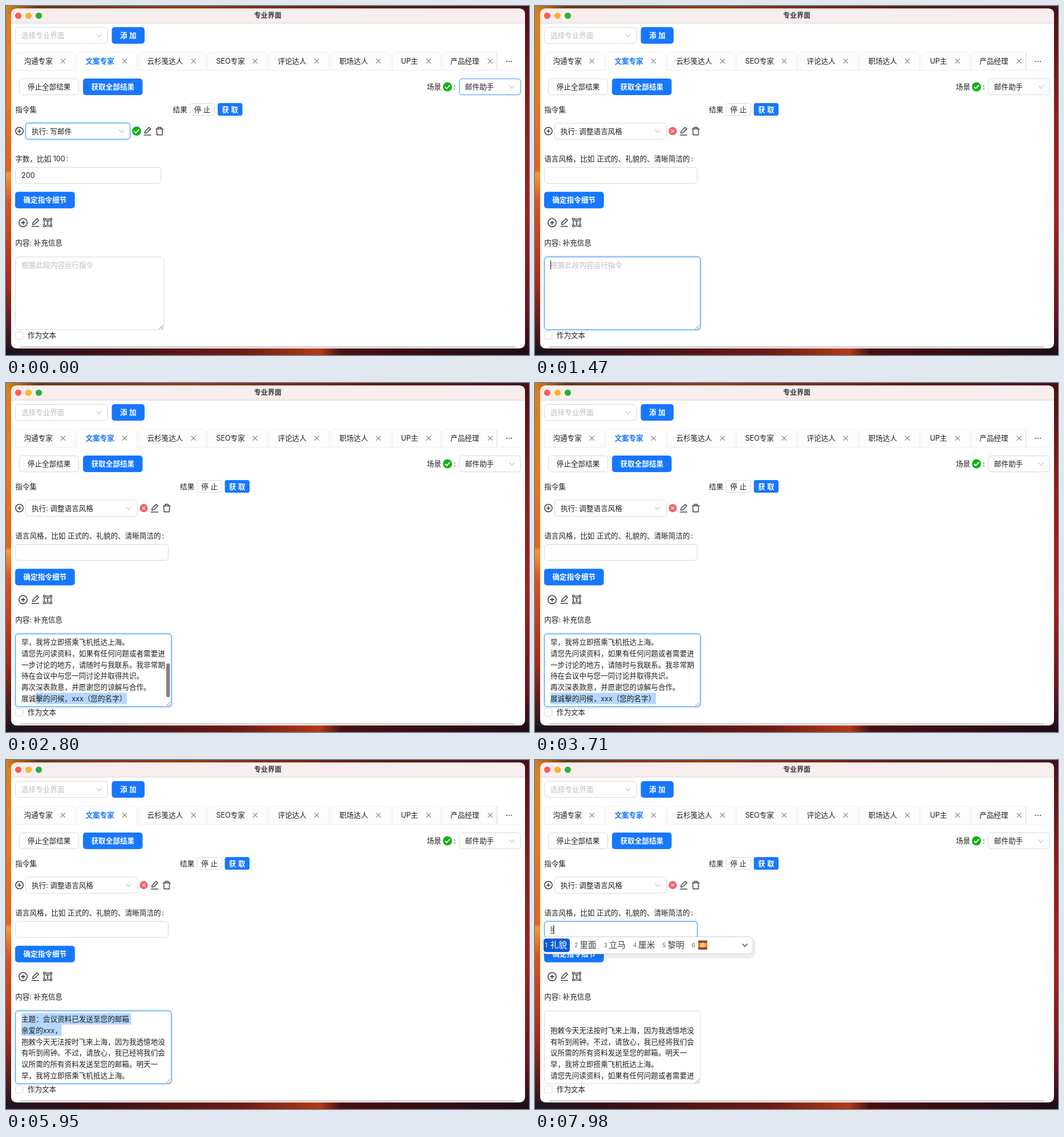
These frames come from a looping animation (917x611 px, 8 s). An HTML page:

```html
<!DOCTYPE html>
<html lang="zh-CN">
<head>
<meta charset="utf-8">
<title>专业界面</title>
<style>
html, body { margin: 0; width: 100%; height: 100%; overflow: hidden; background: #4a1410; }
svg { display: block; width: 100vw; height: 100vh; }
text { font: 12.6px Inter, "Noto Sans CJK SC", "Noto Sans CJK", sans-serif; fill: #1f1f1f; white-space: pre; }
.b { font-weight: 600; }
.mid { text-anchor: middle; }
.white { fill: #fff; }
.dim { fill: #bfbfbf; }
.box { fill: #fff; stroke: #d9d9d9; }
.blue { fill: #1677ff; }
.icon { fill: none; stroke: #1f1f1f; stroke-width: 1.25; }
.chev { fill: none; stroke: #bfbfbf; stroke-width: 1.1; }
.ring { fill: none; stroke: #4096ff; }
.glow { fill: none; stroke: #0591ff; stroke-opacity: .1; stroke-width: 4; }
.sel { fill: #b4d7ff; transform-box: fill-box; transform-origin: right; }
.caret { fill: #111; }
.ime text { font-size: 14.6px; fill: #3f3f3f; }
.ime .n { font-size: 10.5px; fill: #6f6f6f; }
.ime .white { fill: #fff; }

/* 8 s loop: 1% = 80 ms */
.step { animation: 8s step-end infinite; }
.ease { animation: 8s linear infinite; }

.shift { animation-name: shift; }
@keyframes shift { 0% { transform: none } 11.375% { transform: translateX(12.5px) } }
.grow { animation-name: grow; }
@keyframes grow { 0% { width: var(--w) } 11.375% { width: calc(var(--w) + 13px) } }
.before { animation-name: before; }
@keyframes before { 0% { opacity: 1 } 11.375% { opacity: 0 } }
.after { animation-name: after; }
@keyframes after { 0% { opacity: 0 } 11.375% { opacity: 1 } }
.closed { animation-name: closed; }
@keyframes closed { 0% { opacity: 1 } .875% { opacity: 0 } 11.375% { opacity: 1 } }
.start { animation-name: start; }
@keyframes start { 0% { opacity: 1 } .875% { opacity: 0 } }
.open { animation-name: open; }
@keyframes open { 0% { opacity: 0 } .875% { opacity: 1 } 11.375% { opacity: 0 } }
#menu { animation-name: menu; transform-box: fill-box; transform-origin: top; }
@keyframes menu {
  0%, .6% { opacity: 0; transform: scaleY(.8) }
  3.3%, 11.375% { opacity: 1; transform: none }
  13.6%, 100% { opacity: 0; transform: scaleY(.8) }
}
#hover { animation-name: hover; }
@keyframes hover { 0% { opacity: 0 } 9.625% { opacity: 1 } }

#sceneRing { animation-name: sceneRing; }
@keyframes sceneRing { 0%, .875% { opacity: 1 } 3.5%, 100% { opacity: 0 } }
#cmdRing { animation-name: cmdRing; }
@keyframes cmdRing { 0%, 16% { opacity: 1 } 18.3%, 100% { opacity: 0 } }
#areaRing { animation-name: areaRing; }
@keyframes areaRing { 0%, 16% { opacity: 0 } 18.3%, 90.5% { opacity: 1 } 93.6%, 100% { opacity: 0 } }
#inRing { animation-name: inRing; }
@keyframes inRing { 0%, 87% { opacity: 0 } 89.25%, 100% { opacity: 1 } }
#inGlow { animation-name: inGlow; }
@keyframes inGlow { 0%, 90.5% { opacity: 0 } 93.6%, 100% { opacity: 1 } }

#hint { animation-name: hint; }
@keyframes hint { 0% { opacity: 1 } 19.25% { opacity: 0 } }
#body { animation-name: filled; }
@keyframes filled { 0% { opacity: 0 } 19.25% { opacity: 1 } }
#scroll { animation-name: scroll; }
@keyframes scroll {
  0%, 61.5% { transform: translateY(-99px) }
  63.875%, 81.374% { transform: none }
  81.375%, 100% { transform: translateY(-19.8px) }
}
#thumb { animation-name: thumb; }
@keyframes thumb {
  0%, 19.249% { opacity: 0; transform: none }
  19.25%, 26% { opacity: 1 }
  28.875%, 32.374% { opacity: 0 }
  32.375%, 40.5% { opacity: 1 }
  42.875%, 61.4% { opacity: 0 }
  61.5% { opacity: 1; transform: none }
  63.875% { opacity: 1; transform: translateY(-49px) }
  70% { opacity: 1 }
  72.6%, 100% { opacity: 0; transform: translateY(-49px) }
}
#selEnd { animation-name: selEnd; }
@keyframes selEnd {
  0%, 31.6% { opacity: 1; transform: scaleX(0) }
  35% { transform: scaleX(.865) }
  37.625%, 55.999% { opacity: 1; transform: none }
  56%, 100% { opacity: 0; transform: none }
}
#selPrev { animation-name: selPrev; }
@keyframes selPrev { 0% { opacity: 0 } 45.5% { opacity: 1 } 46.375% { opacity: 0 } }
#selTwo { animation-name: selTwo; }
@keyframes selTwo { 0%, 70% { transform: scaleX(0) } 72.6%, 100% { transform: none } }
#selOne { animation-name: selOne; }
@keyframes selOne { 0%, 71.75% { transform: scaleX(0) } 74.375%, 100% { transform: none } }
#tail { animation-name: tail; }
@keyframes tail { 0% { opacity: 1 } 56% { opacity: 0 } }
#head { animation-name: head; }
@keyframes head { 0% { opacity: 1 } 81.375% { opacity: 0 } }
#caretTop { animation-name: caretTop; }
@keyframes caretTop { 0% { opacity: 0 } 16.625% { opacity: 1 } 19.25% { opacity: 0 } 81.375% { opacity: 1 } 87.5% { opacity: 0 } }
#caretEnd { animation-name: caretEnd; }
@keyframes caretEnd { 0% { opacity: 1 } 26.25% { opacity: 0 } }
#caretCut { animation-name: caretCut; }
@keyframes caretCut { 0% { opacity: 0 } 56% { opacity: 1 } 81.375% { opacity: 0 } }
#caretIn { animation-name: caretIn; }
@keyframes caretIn { 0% { opacity: 0 } 91% { opacity: 1 } 96.25% { opacity: 0 } }
#ime { animation-name: ime; }
@keyframes ime { 0% { opacity: 0 } 96.25% { opacity: 1 } }
</style>
</head>
<body>
<svg viewBox="0 0 917 611" preserveAspectRatio="none">
<defs>
  <linearGradient id="top"><stop offset="0" stop-color="#d8831c"/><stop offset=".06" stop-color="#6b3412"/><stop offset=".35" stop-color="#8a3d14"/><stop offset=".7" stop-color="#5a1a12"/><stop offset="1" stop-color="#4a0f14"/></linearGradient>
  <linearGradient id="left" x2="0" y2="1"><stop offset="0" stop-color="#d9821b"/><stop offset=".25" stop-color="#e8781a"/><stop offset=".47" stop-color="#e4631a"/><stop offset=".48" stop-color="#f59a2e"/><stop offset=".56" stop-color="#e0531a"/><stop offset=".8" stop-color="#a52a18"/><stop offset="1" stop-color="#1c1420"/></linearGradient>
  <linearGradient id="right" x2="0" y2="1"><stop offset="0" stop-color="#4a0f14"/><stop offset=".3" stop-color="#8f1c18"/><stop offset=".6" stop-color="#a32119"/><stop offset=".88" stop-color="#6a1220"/><stop offset="1" stop-color="#1e0c16"/></linearGradient>
  <linearGradient id="low"><stop offset="0" stop-color="#1c1420"/><stop offset=".15" stop-color="#3a1018"/><stop offset=".45" stop-color="#6d1a14"/><stop offset=".6" stop-color="#b23a16"/><stop offset=".64" stop-color="#4a1014"/><stop offset="1" stop-color="#1e0c16"/></linearGradient>
  <clipPath id="tabClip"><path d="M9 75H860V115H9z"/></clipPath>
  <clipPath id="areaClip"><path d="M17 440H289V566H17z"/></clipPath>
  <path id="chev" class="chev" d="M-4.6-2.4L0 2.6L4.6-2.4"/>
  <g id="plus" class="icon"><circle r="6.7"/><path d="M-3.4 0H3.4M0-3.4V3.4"/></g>
  <path id="edit" class="icon" d="M-6.5 6.8H6.5M-4.8 3.6L-4.2.4L2.8-6.6L5.6-3.8L-1.4 3.1z"/>
  <path id="trash" class="icon" d="M-6.6-4H6.6M-5.1-4L-4.6 6.6H4.6L5.1-4M-2.7-4V-6.6H2.7V-4"/>
  <g id="tbox" class="icon"><path d="M-4.5-6H4.5M-4.5 6H4.5M-6-4.5V4.5M6-4.5V4.5M-3-2V-3H3V-2M0-3V3.3M-1.5 3.3H1.5"/><path d="M-7.5-7.5h3v3h-3zM4.5-7.5h3v3h-3zM-7.5 4.5h3v3h-3zM4.5 4.5h3v3h-3z" stroke-width="1"/></g>
  <g id="ok"><circle r="8" fill="#0bb414"/><path d="M-4.2.2L-1.3 3.1L4.2-2.8" fill="none" stroke="#fff" stroke-width="2"/></g>
</defs>

<path fill="url(#low)" d="M0 590H917V611H0z"/>
<path fill="url(#left)" d="M0 0H20V611H0z"/>
<path fill="url(#right)" d="M897 0H917V611H897z"/>
<path fill="url(#top)" d="M0 0H917V14H0z"/>
<path fill="url(#low)" d="M0 600H917V611H0z"/>
<rect x="9" y="4.5" width="901" height="595" rx="9" fill="#fff"/>
<path fill="#f8eeee" d="M9 30V13.5a9 9 0 0 1 9-9H901a9 9 0 0 1 9 9V30z"/>
<path fill="#dcd4d4" d="M9 29.5H910V30.5H9z"/>
<circle cx="21.5" cy="17" r="5.6" fill="#fe5b54"/>
<circle cx="39.5" cy="17" r="5.6" fill="#fab32e"/>
<circle cx="57.5" cy="17" r="5.6" fill="#27b23e"/>
<text class="b mid" x="459" y="21.2" style="font-size:12px;fill:#3c3636">专业界面</text>

<rect class="box" x="16.5" y="37.5" width="161.5" height="28" rx="5"/>
<text class="dim" x="27" y="56">选择专业界面</text>
<use href="#chev" x="163" y="51.5"/>
<rect class="blue" x="185.5" y="37" width="57.5" height="29" rx="5"/>
<text class="b mid white" x="214.3" y="56">添 加</text>

<path fill="#f0f0f0" d="M16 112H903V113H16z"/>
<g id="tabs" clip-path="url(#tabClip)"></g>
<path fill="#e2e2e2" d="M860 81H861.5V112H860z"/>
<path stroke="#333" stroke-width="1.7" stroke-dasharray="1.7 2.3" d="M877.2 96.8H888"/>

<rect class="box" x="23.5" y="127.5" width="104" height="28" rx="5"/>
<text class="mid" x="75.6" y="146">停止全部结果</text>
<rect class="blue" x="135" y="127" width="104.5" height="29" rx="5"/>
<text class="b mid white" x="187.3" y="146">获取全部结果</text>
<text x="738" y="146">场景</text>
<use href="#ok" x="774" y="141.5"/>
<text x="785" y="146">:</text>
<rect class="box" x="795" y="127.5" width="107.5" height="28" rx="5"/>
<rect id="sceneRing" class="ease ring" x="795" y="127.5" width="107.5" height="28" rx="5"/>
<text x="805" y="146">邮件助手</text>
<use href="#chev" x="887" y="141.5"/>

<text x="16.2" y="185.5">指令集</text>
<g class="step shift">
  <text x="292.6" y="185.5">结果</text>
  <rect class="box" x="322.7" y="170.5" width="43" height="21" rx="3.5"/>
  <text class="mid" x="344.2" y="185.7">停 止</text>
  <rect class="blue" x="371.2" y="170" width="43.3" height="22" rx="3.5"/>
  <text class="b mid white" x="392.8" y="185.7">获 取</text>
</g>

<use href="#plus" x="23.5" y="219"/>
<rect class="box step grow" style="--w:183px" x="34.5" y="205" width="183" height="28.3" rx="5"/>
<g id="cmdRing" class="ease">
  <rect class="glow step grow" style="--w:185px" x="33.5" y="204" width="185" height="30.3" rx="6"/>
  <rect class="ring step grow" style="--w:183px" x="34.5" y="205" width="183" height="28.3" rx="5"/>
</g>
<text class="step start" x="45" y="223.5">执行: 写邮件</text>
<text class="dim step open" x="45" y="223.5">执行: 写邮件</text>
<text class="step after" x="45" y="223.5">执行: 调整语言风格</text>
<g class="step open"><path class="chev" d="M204.2 220.8l3.2 3.2M205.3 218a3.6 3.6 0 1 1-7.2 0a3.6 3.6 0 0 1 7.2 0"/></g>
<g class="step shift">
  <g class="step closed"><use href="#chev" x="202.7" y="219"/></g>
  <g class="step before"><use href="#ok" x="229" y="219"/></g>
  <g class="step after"><circle cx="229" cy="219" r="7.2" fill="#f0616b"/><path stroke="#fff" stroke-width="1.2" d="M226.4 216.4l5.2 5.2m0-5.2l-5.2 5.2"/></g>
  <use href="#edit" x="248" y="219"/>
  <use href="#trash" x="269.3" y="219"/>
</g>

<text class="step before" x="16.2" y="272.3">字数，比如 100<tspan dx="2">:</tspan></text>
<text class="step after" x="16.2" y="272.3">语言风格，比如 正式的、礼貌的、清晰简洁的<tspan dx="2">:</tspan></text>
<rect class="box step grow" style="--w:255px" x="16.5" y="282.5" width="255" height="28" rx="5"/>
<rect id="inGlow" class="ease glow" x="15.5" y="281.5" width="270" height="30" rx="6"/>
<rect id="inRing" class="ease ring" x="16.5" y="282.5" width="268" height="28" rx="5"/>
<text class="step before" x="27" y="301">200</text>
<rect id="caretIn" class="caret step" x="27" y="288" width="1" height="16"/>

<rect class="blue" x="16" y="325.3" width="104.7" height="29" rx="5"/>
<text class="b mid white" x="68.3" y="344.4">确定指令细节</text>
<g transform="translate(30 379.3) scale(1.08)"><use href="#plus"/></g>
<use href="#edit" x="51.5" y="379"/>
<use href="#tbox" x="73" y="379"/>
<text x="16.2" y="419">内容: 补充信息</text>

<rect class="box step grow" style="--w:260.5px" x="16.5" y="439.2" width="260.5" height="127.5" rx="5"/>
<g id="areaRing" class="ease">
  <rect class="glow" x="15.5" y="438.2" width="275.5" height="129.5" rx="6"/>
  <rect class="ring" x="16.5" y="439.2" width="273.5" height="127.5" rx="5"/>
</g>
<text id="hint" class="dim step" x="27" y="458">根据此段内容运行指令</text>
<g clip-path="url(#areaClip)">
  <g id="body" class="step"><g id="scroll" class="ease">
    <g id="head" class="step">
      <rect id="selOne" class="sel ease" x="27" y="443.3" width="192.5" height="19.8"/>
      <rect id="selTwo" class="sel ease" x="27" y="463.1" width="70.5" height="19.8"/>
    </g>
    <rect id="selPrev" class="sel step" x="27" y="621.5" width="230" height="19.8"/>
    <rect id="selEnd" class="sel ease" x="27" y="641.3" width="185" height="19.8"/>
    <rect id="caretEnd" class="caret step" x="211.5" y="643.5" width="1" height="15.5"/>
    <rect id="caretCut" class="caret step" x="27" y="643.5" width="1" height="15.5"/>
  </g></g>
  <rect id="caretTop" class="caret step" x="27" y="445.5" width="1" height="16"/>
  <rect id="thumb" class="ease" x="281" y="491" width="6.3" height="59" rx="3.1" fill="#828282"/>
</g>
<path class="step shift" fill="none" stroke="#777" d="M268.5 565.5l7-7M272.5 565.5l3-3"/>
<rect class="box" x="16.5" y="570" width="13.5" height="13.5" rx="3.2"/>
<text x="37.8" y="581.3">作为文本</text>
<path fill="#a9a9a9" d="M25 596.2H893V597.6H25z"/>

<g id="menu" class="ease">
  <rect x="27" y="237" width="199.5" height="252.5" rx="15" opacity=".05"/>
  <rect x="32" y="238" width="189" height="240" rx="9" opacity=".05"/>
  <rect x="34" y="237" width="185" height="238" rx="7" fill="#fff"/>
  <path fill="#e4f8ff" d="M42 241H208V269.5H42a4 4 0 0 1-4-4V245a4 4 0 0 1 4-4z"/>
  <rect id="hover" class="step" x="38" y="269.7" width="170" height="28.7" rx="4" fill="#f4f4f4"/>
  <rect x="208" y="240.5" width="7.2" height="45.5" rx="3.6" fill="#7b8492"/>
</g>

<g id="ime" class="step ime">
  <path fill="none" stroke="#333" d="M27 303.5H33"/>
  <text x="27" y="301" style="font-size:12.6px">li</text>
  <rect class="caret" x="32.6" y="288.5" width="1" height="15.5"/>
  <rect x="11" y="311" width="375.5" height="36.5" rx="10" opacity=".07"/>
  <rect x="12.8" y="309.5" width="369.5" height="29.8" rx="7" fill="#fff" stroke="#cfcfcf"/>
  <rect x="15" y="312.5" width="46" height="23.8" rx="4.5" fill="#0a5ad6"/>
  <rect x="286" y="316" width="16" height="16" rx="1.5" fill="#e8862e"/>
  <path fill="#8c4a52" d="M286 316H302V320H286zM286 328H302V332H286z"/>
  <circle cx="294" cy="324" r="4" fill="#ffd552"/>
  <path fill="none" stroke="#444" stroke-width="1.4" d="M363.3 321.7l4.7 4.8l4.7-4.8"/>
</g>
</svg>
<script>
const $ = id => document.getElementById(id);
const ns = 'http://www.w3.org/2000/svg';
function add(parent, tag, attrs, content = '') {
  const el = document.createElementNS(ns, tag);
  for (const k in attrs) el.setAttribute(k, attrs[k]);
  el.textContent = content;
  parent.append(el);
  return el;
}

// tabs: label, left, right
[['沟通专家', 16, 122], ['文案专家', 124, 230], ['云杉笺达人', 232, 351], ['SEO专家', 353, 459],
 ['评论达人', 461, 567], ['职场达人', 569, 675], ['UP主', 677, 763], ['产品经理', 765, 871]
].forEach(([label, l, r], i) => {
  const on = i === 1;
  add($('tabs'), 'path', {
    d: `M${l + .5} 113V87a6 6 0 0 1 6-6H${r - 6.5}a6 6 0 0 1 6 6V113`,
    fill: on ? '#fff' : '#fdfdfd', stroke: '#ededed'
  });
  if (!on) add($('tabs'), 'path', { d: `M${l} 112.5H${r}`, stroke: '#ededed' });
  add($('tabs'), 'text', { x: l + (i === 7 ? 14.3 : 15.4), y: 101, class: on ? 'b' : '', style: on ? 'fill:#1677ff' : '' }, label);
  add($('tabs'), 'path', { d: `M${r - 26.2} 92.7l8 8m0-8l-8 8`, stroke: '#7c7c7c', 'stroke-width': 1.1 });
});

['写邮件', '调整语言风格', '优化邮件标题', '客户反馈邮件', '产品发布邮件', '公开致歉邮件', '团队内部通知', '正式合作邮件']
  .forEach((name, i) => add($('menu'), 'text', { x: 48.8, y: 259.6 + 28.8 * i, class: i ? '' : 'b' }, '执行: ' + name));

const lines = ['主题：会议资料已发送至您的邮箱', '亲爱的xxx，',
  '抱敕今天无法按时飞来上海，因为我透憶地没', '有听到闹钟。不过，请放心，我已经将我们会',
  '议所需的所有资料发送至您的邮箱。明天一', '早，我将立即搭乘飞机抵达上海。',
  '请您先问读资料，如果有任何问题或者需要进', '一步讨论的地方，请随时与我联系。我非常期',
  '待在会议中与您一同讨论并取得共识。', '再次深表款意，并愿谢您的谅解与合作。',
  '展诚擊的问候，xxx（您的名字）'];
lines.forEach((line, i) => {
  const el = add(i < 2 ? $('head') : $('scroll'), 'text', { x: 27, y: 458 + 19.8 * i }, line);
  if (i === lines.length - 1) { el.id = 'tail'; el.setAttribute('class', 'step'); }
});

// input-method candidates
['礼貌', '里面', '立马', '厘米', '黎明', ''].forEach((word, i) => {
  const x = i ? 69 + 51.4 * (i - 1) : 17.5, hot = i ? '' : ' white';
  add($('ime'), 'text', { x, y: 328.2, class: 'n' + hot }, i + 1);
  add($('ime'), 'text', { x: x + 9.3, y: 329.4, class: hot }, word);
});
</script>
</body>
</html>
```
